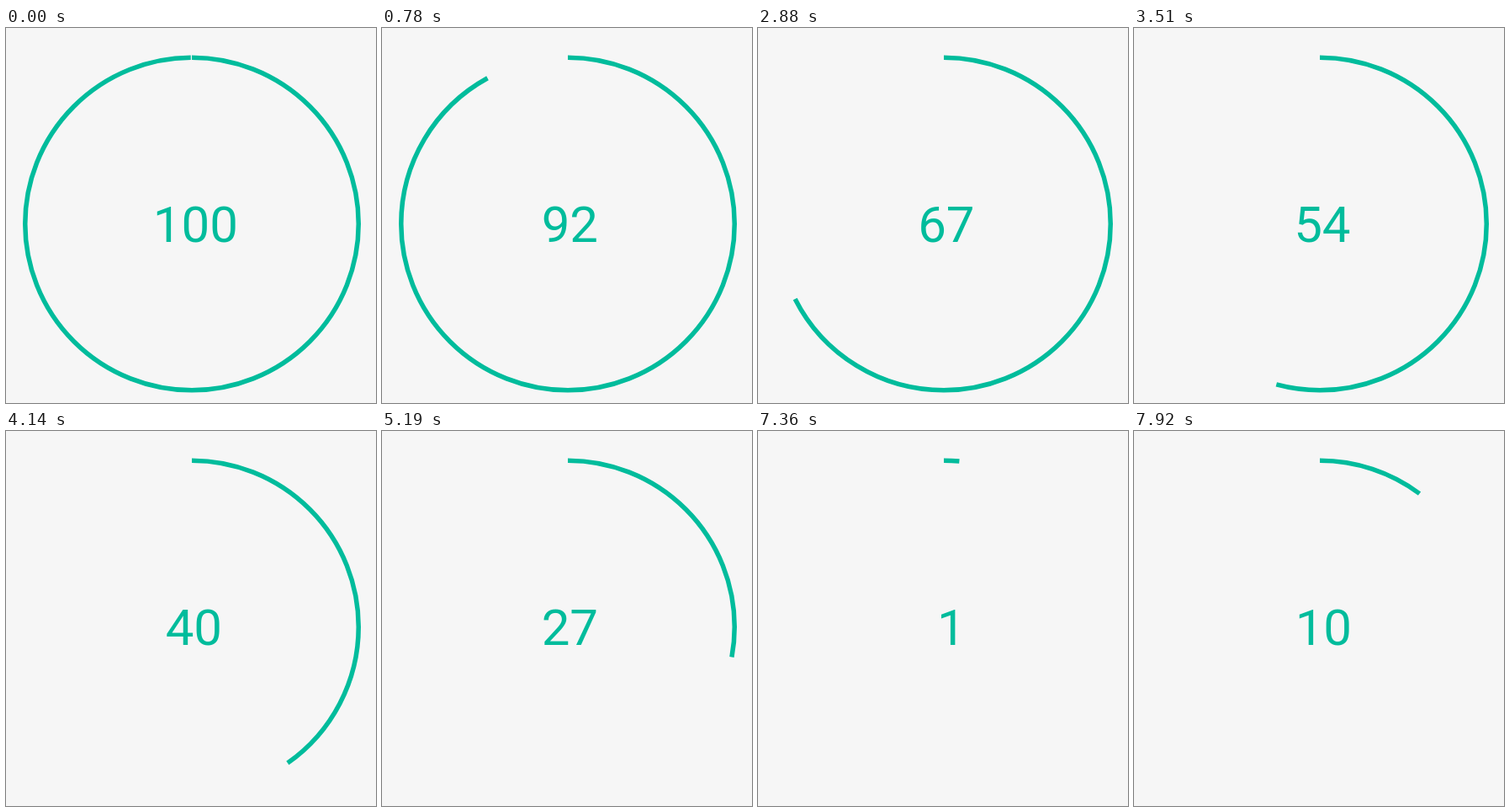
Animation of 440 by 447 pixels, one loop 7.99 s. Source, as an HTML page with a canvas:

```html
<!DOCTYPE html>
<html>
<head>
<meta charset="utf-8">
<style>
html, body { margin: 0; height: 100%; overflow: hidden; background: #f6f6f6; }
canvas { display: block; }
</style>
</head>
<body>
<canvas id="stage" width="440" height="447"></canvas>
<script>
const ctx = document.getElementById('stage').getContext('2d');
const LOOP = 7990, TICK = 70, TEAL = '#00bc9c';

// Each drop: start time, number of ticks, value reached
const drops = [
  [500, 5, 92], [1340, 3, 83.2], [2040, 4, 76.5], [2670, 4, 67.55],
  [3300, 4, 54.2], [3930, 4, 40.26], [4630, 4, 28.8], [5190, 5, 19.5],
  [5820, 4, 10.09], [6450, 4, 1.37]
];
const refill = { start: 7360, rate: 0.109 };

const easeInOut = u => (1 - Math.cos(Math.PI * u)) / 2;
const ticksSince = (t, start) => Math.floor((t - start) / TICK) + 1;

function valueAt(t) {
  let value = 100;
  for (const [start, ticks, to] of drops) {
    if (t < start) break;
    const u = Math.min(1, ticksSince(t, start) / ticks);
    value += (to - value) * easeInOut(u);
  }
  if (t >= refill.start) value += refill.rate * ticksSince(t, refill.start) ** 2;
  return value;
}

function draw(value) {
  ctx.fillStyle = '#f6f6f6';
  ctx.fillRect(0, 0, 440, 447);

  // A full ring keeps a hairline gap at the top
  const sweep = Math.min(value, 99.9) / 100 * 2 * Math.PI;
  ctx.strokeStyle = ctx.fillStyle = TEAL;
  ctx.lineWidth = 5.5;
  ctx.beginPath();
  ctx.arc(221, 233.5, 198.25, -Math.PI / 2, sweep - Math.PI / 2);
  ctx.stroke();

  // The label's origin is offset by half its ink width
  const label = String(Math.floor(value));
  ctx.font = '400 60px Roboto, sans-serif';
  const m = ctx.measureText(label);
  const ink = m.actualBoundingBoxLeft + m.actualBoundingBoxRight;
  ctx.fillText(label, 221.5 - ink / 2, 255);
}

const begin = performance.now();
function frame() {
  draw(valueAt((performance.now() - begin) % LOOP));
  requestAnimationFrame(frame);
}
frame();
</script>
</body>
</html>
```
